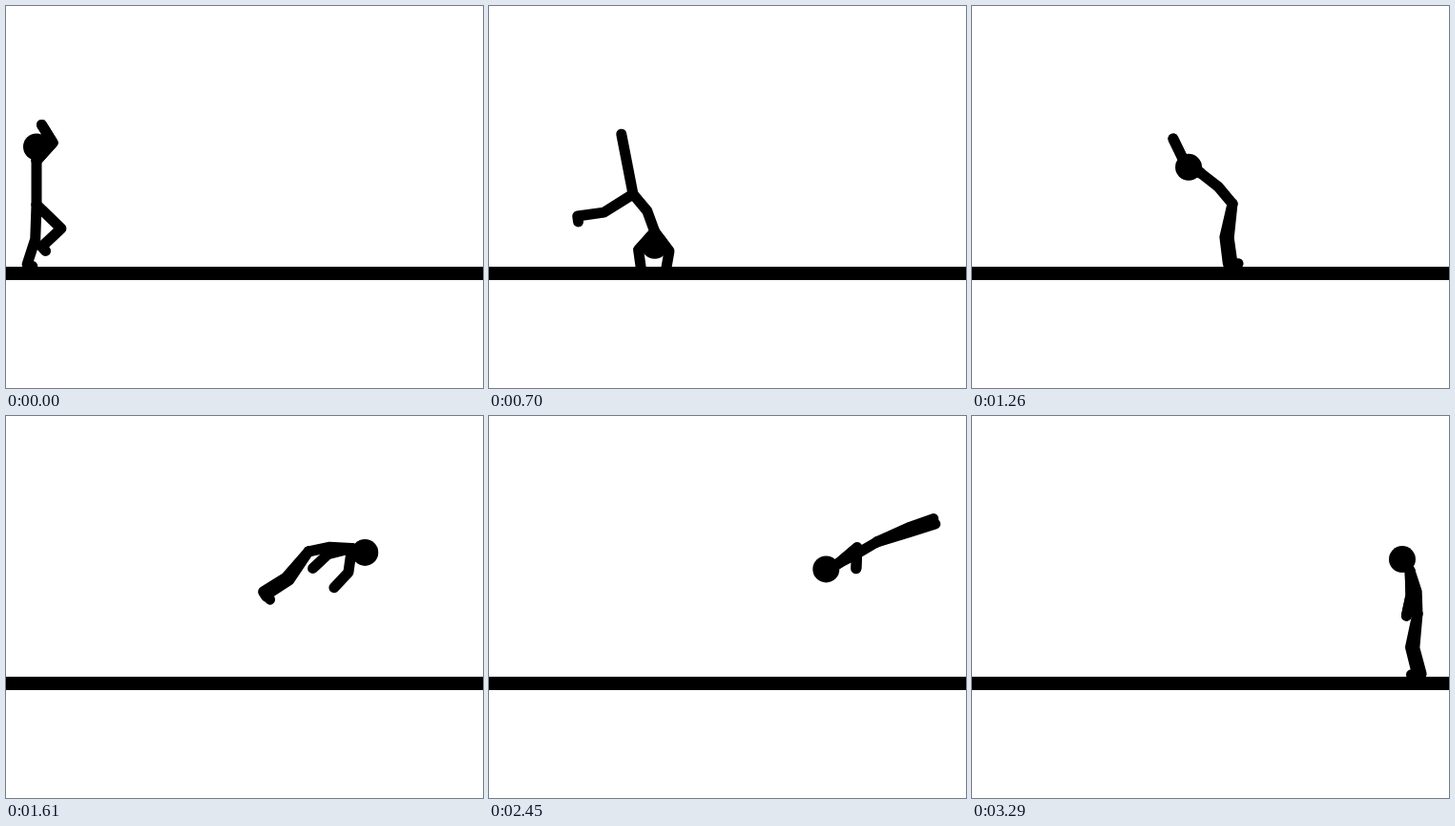
Animation of 500 by 400 pixels, one loop 3.43 s. Source, as an HTML page with a canvas:

```html
<!DOCTYPE html>
<html lang="en">
<head>
<meta charset="utf-8">
<title>Stick figure tumbling</title>
<style>
  html, body { margin: 0; height: 100%; overflow: hidden; background: #fff; }
  canvas { display: block; }
</style>
</head>
<body>
<canvas id="stage" width="500" height="400"></canvas>
<script>
const ctx = document.getElementById('stage').getContext('2d');
const STEP = 70, LOOP = 3430, LAST = 3290, TWIST = 2100;
const SPINE = 23, NECK = 14.5, UPPER_ARM = 25.5, FOREARM = 22, THIGH = 36, SHIN = 28, FOOT = 6;

// Spine: direction in degrees (0 down, 90 right, 180 up), falling as the body
// rolls forward, and the curl added at each joint up to the head.
// Arms and legs: swing away from the spine, then bend at the elbow or knee.
const poses = [];
function pose(time, hip, spine, arm, leg, leg2 = [leg[0] - 7, leg[1] + 6], arm2 = arm) {
  poses.push({ time, hip, angles: [spine, arm, arm2, leg, leg2].flat() });
}

// Step into a handspring
pose(0, [32, 208], [180, 0], [138, 74], [-2, -16], [46, -93]);
pose(420, [84, 206], [130, -10], [110, -10], [-5, -15], [55, -7]);
pose(700, [151, 197], [40, -20], [177, -47], [-29, 0], [82, -24], [98, 50]);
pose(910, [180, 188], [0, 0], [205, -40], [-30, 0], [-10, -5], [145, 45]);
pose(1260, [273, 207], [-140, 12], [190, -24], [-46, 14]);
// Dive into a somersault, land and stand
pose(1400, [282, 207], [-185, -5], [100, 15], [3, -13]);
pose(1610, [317, 142], [-258, -15], [70, -35], [44, -23], undefined, [2, 29]);
pose(TWIST, [370, 97], [-339, -6], [31, -112], [12, -15]);
pose(2730, [436, 210], [-484, 0], [-7, -150], [-34, 13], [-15, -1]);
pose(LAST, [467, 207], [-538, 16], [0, -14], [-7, 20]);

const lerp = (a, b, k) => a + (b - a) * k;

// Slow down on the way up, speed up on the way down.
const gravity = (a, b, k) => lerp(a, b, b < a ? 1 - (1 - k) ** 2 : k * k);

function move([x, y], angle, length) {
  const r = angle * Math.PI / 180;
  return [x + Math.sin(r) * length, y + Math.cos(r) * length];
}

function line(...points) {
  ctx.beginPath();
  points.forEach(p => ctx.lineTo(...p));
  ctx.stroke();
}

function drawArm(neck, angle, bend) {
  const elbow = move(neck, angle, UPPER_ARM);
  line(neck, elbow, move(elbow, angle + bend, FOREARM));
}

function drawLeg(hip, angle, bend, facing) {
  const knee = move(hip, angle, THIGH);
  const ankle = move(knee, angle + bend, SHIN);
  const pointed = ankle[1] < hip[1];
  line(hip, knee, ankle, pointed ? ankle : move(ankle, angle + bend + 90 * facing, FOOT));
}

function draw(time) {
  const i = Math.max(1, poses.findIndex(p => p.time >= time));
  const from = poses[i - 1], to = poses[i];
  const k = (time - from.time) / (to.time - from.time);
  const hip = [lerp(from.hip[0], to.hip[0], k), gravity(from.hip[1], to.hip[1], k)];
  const [spine, curl, ...limbs] = from.angles.map((v, n) => lerp(v, to.angles[n], k));
  const down = spine - 180;
  const facing = time < TWIST ? 1 : -1;

  ctx.fillStyle = '#fff';
  ctx.fillRect(0, 0, 500, 400);
  ctx.fillStyle = ctx.strokeStyle = '#000';
  ctx.lineWidth = 11;
  ctx.lineCap = ctx.lineJoin = 'round';
  ctx.fillRect(0, 273, 500, 14);

  const chest = move(hip, spine, SPINE);
  const neck = move(chest, spine + curl, SPINE);
  const head = move(neck, spine + 2 * curl, NECK);
  line(hip, chest, neck, head);
  drawArm(neck, down + limbs[0], limbs[1]);
  drawArm(neck, down + limbs[2], limbs[3]);
  drawLeg(hip, down + limbs[4], limbs[5], facing);
  drawLeg(hip, down + limbs[6], limbs[7], facing);
  ctx.beginPath();
  ctx.arc(...head, 14, 0, 2 * Math.PI);
  ctx.fill();
}

const start = performance.now();
function tick() {
  const time = (performance.now() - start) % LOOP;
  draw(Math.min(LAST, Math.floor(time / STEP) * STEP));
  requestAnimationFrame(tick);
}
tick();
</script>
</body>
</html>
```
